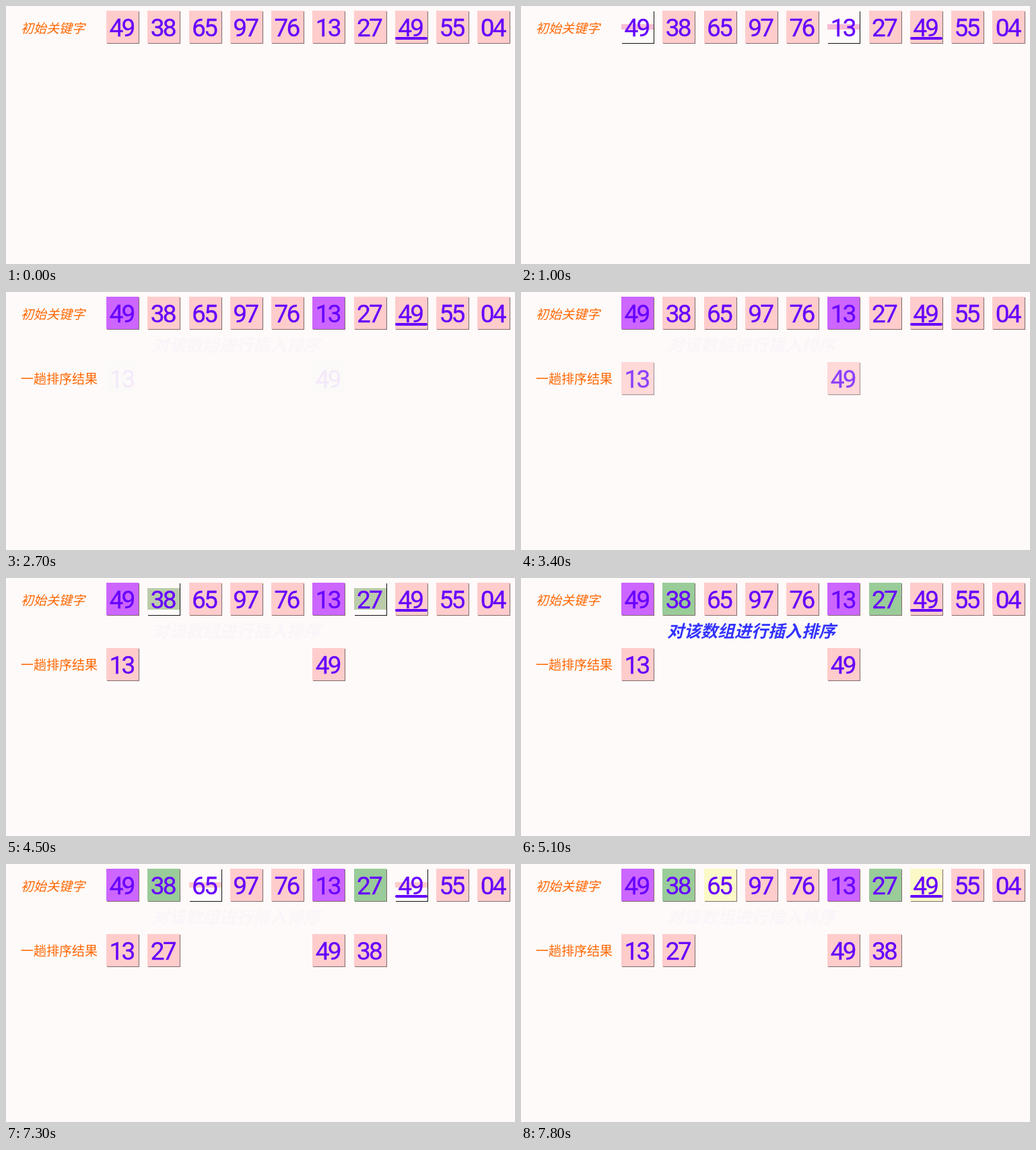
An HTML page for the animation above (8000 ms loop, 756 by 383 pixels).

```html
<!DOCTYPE html>
<html lang="zh">
<head>
<meta charset="utf-8">
<title>希尔排序</title>
<style>
  html, body { margin: 0; width: 100%; height: 100%; overflow: hidden; background: #fefaf9; }
  #stage { position: relative; width: 756px; height: 383px; overflow: hidden; }
  .tile, .fill, .num, .label, .note { position: absolute; }
  .tile { width: 48px; height: 48px; box-shadow: 1px 1px 0 #806a6a; }
  .fill { inset: 0; background: #ffcccc; }
  .num {
    inset: 0; text-align: center; color: #6600ff; white-space: nowrap;
    font: 37px/51px Roboto, "Liberation Sans", sans-serif;
    letter-spacing: -2.8px; text-indent: -2.8px;
    -webkit-text-stroke: .3px #6600ff;
  }
  .mark { position: absolute; left: 0; top: 38.5px; width: 48px; height: 4.5px; border-radius: 2px; background: #6600ff; }
  .label, .note { white-space: nowrap; font-family: "Noto Sans CJK SC", "Noto Sans CJK", sans-serif; }
  .label { left: 22px; color: #ff6600; font-size: 19px; line-height: 24px; }
  .note { left: 217px; top: 62px; color: #3333ff; font-size: 25px; line-height: 30px; font-weight: bold; font-style: italic; }
</style>
</head>
<body>
<div id="stage"></div>
<script>
const LOOP = 8000, PINK = '#ffcccc';
const EDGE = '1px 1px 0 #806a6a', DARK = '1px 1px 0 #111';
const stage = document.getElementById('stage');

function add(parent, cls, text = '') {
  const el = document.createElement('div');
  el.className = cls;
  el.textContent = text;
  parent.append(el);
  return el;
}

// keys: [ms, properties, easing until the next key]
function play(el, keys) {
  const frames = keys.map(([ms, props, easing = 'step-end']) => ({ offset: ms / LOOP, easing, ...props }));
  frames.push({ ...frames.at(-1), offset: 1 });
  el.animate(frames, { duration: LOOP, iterations: Infinity }).startTime = 0;
}

function tile(col, top, value) {
  const el = add(stage, 'tile');
  el.style.left = 149 + col * 61.25 + 'px';
  el.style.top = top + 'px';
  const fill = add(el, 'fill');
  add(el, 'num', value);
  return { el, fill };
}

// Colour spreads from the middle line while the rest of the tile is empty.
function wipe({ el, fill }, color, start, end, from, steps) {
  play(fill, [
    [0, { transform: 'scaleY(1)', backgroundColor: PINK }],
    [start, { transform: `scaleY(${from})`, backgroundColor: PINK }, `steps(${steps}, end)`],
    [end, { transform: 'scaleY(1)', backgroundColor: color }]
  ]);
  play(el, [[0, { boxShadow: EDGE }], [start, { boxShadow: DARK }], [end, { boxShadow: EDGE }]]);
}

function fadeIn({ el, fill }, times) {
  play(el, [[0, { opacity: 0 }], ...times.map((ms, i) => [ms, { opacity: i ? i / 8 : 0.07 }])]);
  play(fill, [[0, { backgroundColor: '#d8ffff' }], [times[1], { backgroundColor: PINK }]]);
  play(el, [[0, { boxShadow: 'none' }], [times[1], { boxShadow: EDGE }]]);
}

const heading = add(stage, 'label', '初始关键字');
heading.style.cssText = 'top:20px;font-style:italic';
const result = add(stage, 'label', '一趟排序结果');
result.style.top = '116px';
play(result, [[0, { opacity: 0 }], [2700, { opacity: 1 }]]);

const note = add(stage, 'note', '对该数组进行插入排序');
const faint = { opacity: 0.025 };
play(note, [[0, { opacity: 0 }], [1900, { opacity: 1 }], [2700, faint], [5100, { opacity: 1 }], [5800, faint]]);

const row = ['49', '38', '65', '97', '76', '13', '27', '49', '55', '04'].map((n, i) => tile(i, 7, n));
add(row[7].el, 'mark');

for (const i of [0, 5]) wipe(row[i], '#cc66ff', 900, 1500, 0, 6);
for (const i of [1, 6]) wipe(row[i], '#99cc99', 4100, 4700, 0, 6);
for (const i of [2, 7]) wipe(row[i], '#fbf9c8', 7300, 7800, 1 / 6, 5);

const first = [2700, 2800, 3000, 3100, 3200, 3300, 3400, 3500, 3600];
const second = first.map((_, i) => 5800 + i * 100);
fadeIn(tile(0, 104, '13'), first);
fadeIn(tile(5, 104, '49'), first);
fadeIn(tile(1, 104, '27'), second);
fadeIn(tile(6, 104, '38'), second);
</script>
</body>
</html>
```
